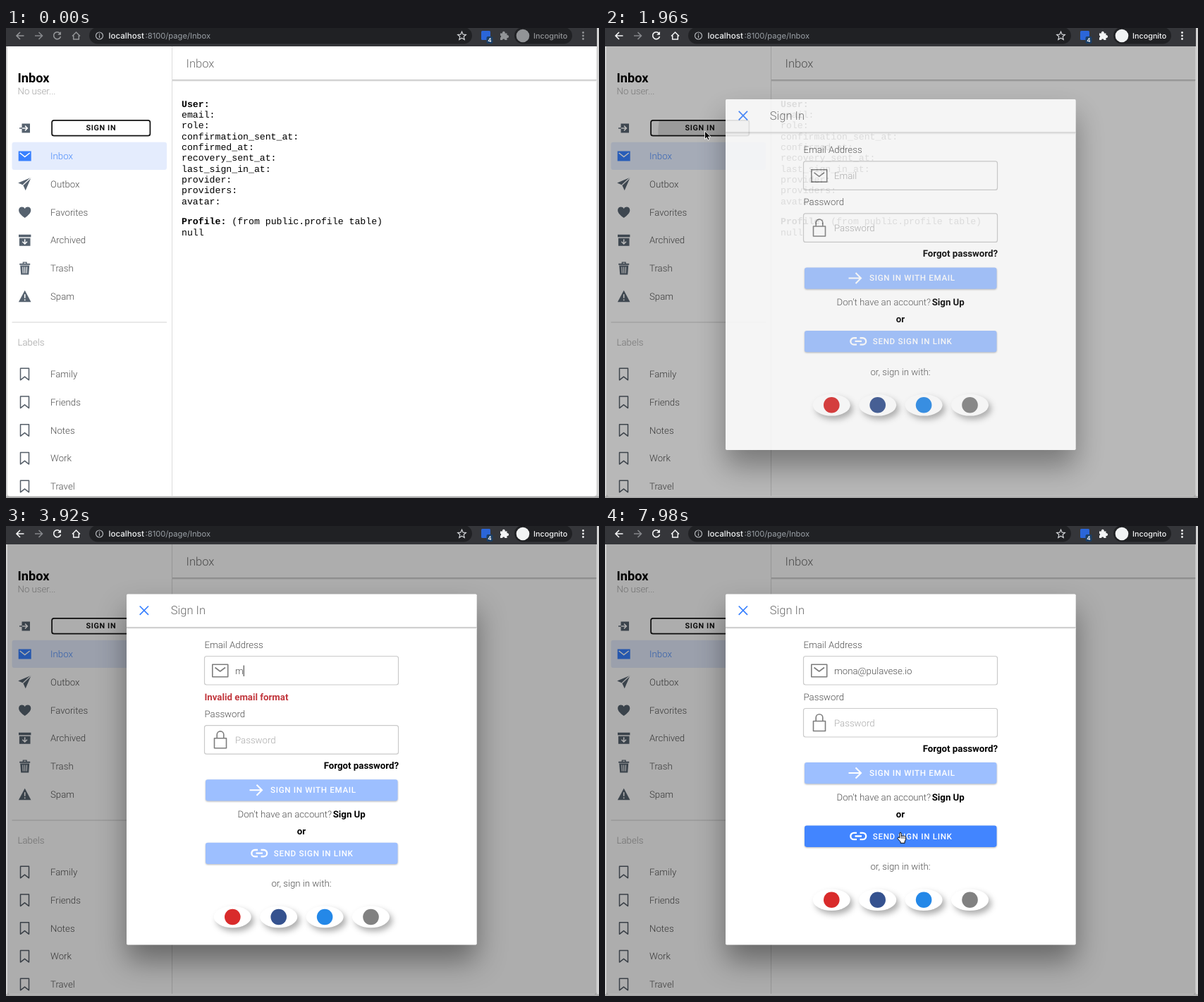
Recreate the animation shown at these times as an HTML page. Size 841 px wide and 666 px high, loop 8 s.

```html
<!DOCTYPE html>
<html lang="en">
<head>
<meta charset="utf-8">
<title>Inbox sign in</title>
<style>
html, body { margin: 0; width: 100%; height: 100%; overflow: hidden; background: #d2d2d2; }
svg { display: block; width: 841px; height: 666px; font-family: Roboto, sans-serif; text-rendering: geometricPrecision; }
.ui { font-family: Inter, "Open Sans", sans-serif; }
.code { font-family: "Liberation Mono", monospace; }
.caps { letter-spacing: .06em; }
.panel { filter: drop-shadow(0 23px 20px rgba(0,0,0,.4)); }
.button { filter: drop-shadow(0 1.5px 1.2px rgba(0,0,0,.28)); }
.pill { filter: drop-shadow(4px 5px 4px rgba(0,0,0,.32)); }
</style>
</head>
<body>
<svg id="stage" viewBox="0 0 841 666"></svg>
<script>
const stage = document.getElementById('stage');
const LOOP = 8000, STEP = 70, ROW = 39.75, BLUE = '#3880ff', ICON = '#56626f';
const EMAIL = 'mona@pulavese.io';
const KEY_TIMES = [3850, 4060, 4130, 4200, 4480, 4830, 4900, 5110, 5180, 5390, 5460, 5530, 5530, 5740, 6020, 6370];
const FOLDERS = ['Inbox', 'Outbox', 'Favorites', 'Archived', 'Trash', 'Spam'];
const LABELS = ['Family', 'Friends', 'Notes', 'Work', 'Travel'];
const FIELDS = ['email', 'role', 'confirmation_sent_at', 'confirmed_at', 'recovery_sent_at',
  'last_sign_in_at', 'provider', 'providers', 'avatar'];

// Pointer path: time, x, y
const PATH = [
  [70, 746, 648], [420, 428, 521], [840, 428, 521], [980, 250, 470], [1050, 90, 380], [1120, 40, 268],
  [1190, 40, 268], [1260, 147, 252], [1330, 146, 222], [1400, 144, 184], [1470, 142, 154], [1610, 141.5, 146],
  [2030, 141.5, 146], [2240, 230, 172], [2520, 371, 225], [2730, 371, 192], [2800, 371, 192],
  [3080, 375, 196], [3290, 377, 200], [6860, 377, 200], [7210, 390, 400], [7350, 408, 512],
  [7420, 408, 514], [7700, 418, 436], [7770, 419, 434.5]
];

const rect = (x, y, w, h, fill, r = 0, more = '') =>
  `<rect x="${x}" y="${y}" width="${w}" height="${h}" rx="${r}" fill="${fill}" ${more}/>`;
const circle = (x, y, r, fill, more = '') => `<circle cx="${x}" cy="${y}" r="${r}" fill="${fill}" ${more}/>`;
const shape = (d, fill) => `<path d="${d}" fill="${fill}"/>`;
const line = (d, color, w = 1.6, more = '') =>
  `<path d="${d}" fill="none" stroke="${color}" stroke-width="${w}" ${more}/>`;
const text = (x, y, s, fill, size = 13.24, weight = 300, more = '') =>
  `<text x="${x}" y="${y}" fill="${fill}" font-size="${size}" font-weight="${weight}" ${more}>${s}</text>`;
const at = (x, y, s, more = '') => `<g transform="translate(${x} ${y})" ${more}>${s}</g>`;
const MIDDLE = 'text-anchor="middle"';
const underline = (x, y, w) => ['#c9c9c9', '#d9d9d9', '#f0f0f0'].map((c, i) => rect(x, y + i, w, 1, c)).join('');

const folderIcons = [
  shape('M-9-7H9V7H-9Z', BLUE) + line('M-7-4.5L0 1L7-4.5', '#fff', 1.5),
  shape('M9-9.5L-9.5-1.8L-2.5 1.2L1 9Z', ICON) + line('M9-9.5L-2.5 1.2', '#fff', 1.2),
  shape('M0 8C-5 4.5-8.6 1-8.6-2.8C-8.6-8-2.4-9-0-5C2.4-9 8.6-8 8.6-2.8C8.6 1 5 4.5 0 8Z', ICON),
  rect(-8.7, -8, 17.4, 3.6, ICON) + rect(-7.8, -3, 15.6, 11, ICON) +
    line('M0-1.5V5M-3.3 2L0 5.3L3.3 2', '#fff', 1.5),
  shape('M-7.5-6.8H-3V-9H3V-6.8H7.5V-4.8H-7.5ZM-6.5-4H6.5L5.5 9H-5.5Z', ICON) +
    line('M-2.8-2L-2.4 7M0-2V7M2.8-2L2.4 7M-1.5-7.2H1.5', '#fff', 1.1),
  shape('M0-8.5L8.8 8H-8.8Z', ICON) + line('M0-3V2.5M0 4.2V6', '#fff', 1.6)
];
const bookmark = line('M-6-8.3H6V8.3L0 3.6L-6 8.3Z', '#555e68', 1.5, 'stroke-linejoin="round"');

function browserBar(active) {
  const fg = active ? '#f4f5f6' : '#929497', dim = '#85878b';
  return rect(0, 0, 838, 26, '#35363a') +
    line('M25.500 11H15M20 6L15 11L20 16', fg, 1.6) +
    line('M41 11H51.500M46.500 6L51.500 11L46.500 16', dim, 1.6) +
    line('M76.500 7.500A5 5 0 1 0 77.500 12', fg, 1.6) + shape('M78 5V9.800H73.200Z', fg) +
    line('M94 11.500L99.500 6L105 11.500M95.700 10.500V16H103.300V10.500', fg, 1.5) +
    rect(118, -1, 543, 23.5, '#202124', 11.7) +
    circle(132.5, 11, 5, 'none', 'stroke="#b4b7bb" stroke-width="1.200"') + line('M132.500 10.300V14M132.500 8V9.300', '#b4b7bb', 1.2) +
    text(145.500, 15.2, 'localhost', '#f1f3f4', 11.6, 500, 'class="ui"') +
    text(197.500, 15.2, ':8100/page/Inbox', '#9aa0a6', 11.2, 400, 'class="ui"') +
    line('M646.500 5.300L648.200 9.200L652.300 9.500L649.200 12.300L650.200 16.400L646.500 14.200L642.800 16.400L643.800 12.300L640.700 9.500L644.800 9.200Z', '#d5d7da', 1.2) +
    rect(674, 4, 13, 13, '#2b66d9', 1.5) + rect(681.5, 12, 9, 10, '#1c3f66', 2) +
    text(686, 20.3, '4', '#fff', 8, 600, 'class="ui" ' + MIDDLE) +
    shape('M701 7.500H704A2 2 0 1 1 707.700 7.500H710.500V10.200A2 2 0 1 1 710.500 14V17H707.500A1.800 1.800 0 0 0 704 17H701V13.800A1.800 1.800 0 0 0 701 10.400Z', fg) +
    rect(721, -1, 82, 23.5, '#202124', 11.7) + circle(733, 11, 9.3, active ? '#f1f3f4' : '#929497') +
    text(748, 15, 'Incognito', fg, 10.8, 500, 'class="ui"') +
    [6.5, 11, 15.5].map(y => circle(818.5, y, 1.4, fg)).join('');
}

function page(t, mouse) {
  const hover = t >= 1260 && t < 1470 ? Math.round((mouse.y + 6 - 181.5) / ROW) : -1;
  let s = rect(2, 20, 835.5, 643.5, '#fff', 4) + rect(235, 26, 1, 637.5, '#dcdcdc') +
    underline(236, 73, 601.5) + text(255.5, 55.6, 'Inbox', '#6c6c6c', 16.55) +
    text(16.5, 77, 'Inbox', '#000', 18.2, 700) + text(16.5, 94, 'No user...', '#a5a5a5') +
    rect(22.5, 135.5, 11.5, 13, ICON) + line('M19 142H23', ICON, 1.5) +
    line('M23 142H30M27 138.600L30.400 142L27 145.400', '#fff', 1.5);

  const age = t - 1750;
  if (t >= 1470 && t < 2030) s += rect(65, 131, 139, 22, 'rgba(0,0,0,.04)', 3);
  if (age >= 0 && age < 700) {
    const fade = Math.min(1, (700 - age) / 350);
    s += `<clipPath id="btn">${rect(65, 131, 139, 22, '#000', 3)}</clipPath>` +
      circle(141.5, 146, 20 + Math.min(age, 420) * .22, '#000', `opacity="${.12 * fade}" clip-path="url(#btn)"`);
  }
  s += rect(65.1, 130.9, 139.3, 21.8, 'none', 3, 'stroke="#111" stroke-width="1.700"') +
    text(134.8, 145.4, 'SIGN IN', '#111', 10.8, 700, 'class="caps" ' + MIDDLE);

  FOLDERS.forEach((name, i) => {
    const y = 181.5 + ROW * i;
    if (!i) s += rect(8.5, 161.8, 219.5, 39.2, '#e4ecfd', 3.3);
    else if (i === hover) s += rect(8.5, y - 19.8, 219.5, 39.4, '#f6f6f6', 3.3);
    s += at(26.7, y, folderIcons[i]) + text(63, y + 4.6, name, i ? '#505050' : '#4b8bfa');
  });
  s += rect(8.5, 416.5, 219.5, 1, '#d4d4d4') + text(16.5, 449.5, 'Labels', '#a0a0a0');
  LABELS.forEach((name, i) => {
    const y = 490.5 + ROW * i;
    s += at(26.5, y, bookmark) + text(63, y + 4.6, name, '#505050');
  });

  const code = (i, str, weight = 400, x = 249) => text(x, 111.7 + 15.33 * i, str, '#000', 13.2, weight, 'class="code"');
  s += code(0, 'User:', 700) + FIELDS.map((f, i) => code(i + 1, f + ':')).join('') +
    code(10.86, 'Profile:', 700) + code(10.86, '(from public.profile table)', 400, 320.3) + code(11.86, 'null');

  if (t >= 1260 && t < 1610) {
    const name = FOLDERS[Math.max(0, hover)];
    s += shape(`M2 646.500H${name === 'Favorites' ? 149 : 138}q3 0 3 3V663.500H2Z`, '#55585c') +
      text(6, 658.6, 'localhost:8100/page/' + name, '#dcdee0', 9.6, 400, 'class="ui"');
  }
  return s;
}

function input(y, icon, value, color) {
  return rect(281.5, y, 275, 40.5, '#fff', 3, 'stroke="#cacaca" stroke-width="1.200"') + icon +
    text(325, y + 25.3, value, color);
}

function button(y, label, x, icon, fill) {
  return rect(283, y, 272.5, 30.3, fill, 3.3, 'class="button"') + icon +
    text(x, y + 18.9, label, '#fff', 11.6, 500, 'class="caps"');
}

function modal(t) {
  const typed = EMAIL.slice(0, KEY_TIMES.filter(k => k <= t).length);
  const done = typed === EMAIL, error = typed && !done;
  const caret = t >= 3360 && t < 6930 || t >= 7420 && t < 7980;
  const mail = line('M292.800 196.300H314.700V213.700H292.800ZM296.500 200.500L303.700 206L311 200.500', '#7d7d7d', 1.6, 'stroke-linejoin="round"');
  const lock = line('M295.500 276.500H312.500V290.500H295.500ZM299.200 276.500V271.500a4.800 4.800 0 0 1 9.600 0V276.500', '#7d7d7d', 1.6, 'stroke-linejoin="round"');
  const arrow = line('M345.500 350H362.500M355.500 342.500L363 350L355.500 357.500', '#fff', 2.1);
  const link = line('M357 434.800H353a4.700 4.700 0 0 0 0 9.400H357M361.500 434.800H365.500a4.700 4.700 0 0 1 0 9.400H361.500M354.500 439.500H364', '#fff', 2.3);
  const lower = text(281.5, 246.5, 'Password', '#505050') + input(258.5, lock, 'Password', '#ababab') +
    text(557, 320, 'Forgot password?', '#000', 13.24, 700, 'text-anchor="end"') +
    button(335, 'SIGN IN WITH EMAIL', 375, arrow, '#9dbfff') +
    text(328.5, 389, "Don't have an account?", '#505050') + text(463.7, 389, 'Sign Up', '#000', 13.24, 700) +
    text(419, 413, 'or', '#000', 13.24, 700, MIDDLE) +
    button(424.6, 'SEND SIGN IN LINK', 379.7, link, done ? '#4285ff' : '#9dbfff') +
    text(419, 487.3, 'or, sign in with:', '#505050', 13.24, 300, MIDDLE) +
    ['#d92b2b', '#35528f', '#2488e8', '#818181'].map((c, i) => {
      const x = 321.3 + 65.4 * i;
      return `<ellipse cx="${x}" cy="529.800" rx="26.500" ry="15.300" fill="#fff" class="pill"/>` + circle(x, 529.8, 11.3, c);
    }).join('');
  return rect(171, 96.5, 496.7, 497, '#fff', 1.7, 'class="panel"') + underline(171, 143, 496.7) +
    line('M189.700 113.500L202 125.800M202 113.500L189.700 125.800', BLUE, 1.7) +
    text(233.8, 125.4, 'Sign In', '#6c6c6c', 16.55) + text(281.5, 172.8, 'Email Address', '#505050') +
    input(184.5, mail, `<tspan id="typed">${typed || 'Email'}</tspan>`, typed ? '#505050' : '#ababab') +
    (caret ? `<rect id="caret" x="325" y="197.500" width="1" height="15.500" fill="#333"/>` : '') +
    (error ? text(281.5, 246.5, 'Invalid email format', '#c2383e', 13.24, 700) : '') +
    at(0, error ? 24.2 : 0, lower);
}

function pointer(t, { x, y }) {
  if (t < 70 || t >= 3850 && t < 6930) return '';
  if (t >= 2520 && t < 3850 || t < 7000 && t >= 6930)
    return at(x, y, line('M-3-6.500Q0-6.500 0-4.500Q0-6.500 3-6.500M0-5V5M-3 6.500Q0 6.500 0 4.500Q0 6.500 3 6.500M-1.500 2H1.500', '#000', 1.2));
  const hand = t >= 1260 && t < 1890 || t >= 7140 && y > 424 && y < 455;
  return hand
    ? at(x - 4.5, y - .5, '<path d="M3.300 8V1.700a1.200 1.200 0 0 1 2.400 0V5.600a1.100 1.100 0 0 1 2.100 0a1.100 1.100 0 0 1 2.100.5a1.100 1.100 0 0 1 2.100.6V10.500L10.600 13V15.300H4.600V13.500L.7 9.200a1.100 1.100 0 0 1 1.600-1.500Z" fill="#fff" stroke="#000" stroke-width="1"/>' +
      line('M5.700 6V9M7.800 6.500V9M9.900 7V9', '#000', .7))
    : at(x, y, '<path d="M0 0V11.500L2.700 9L4.600 13L6.600 12L4.800 8.200H8.500Z" fill="#000" stroke="#fff" stroke-width=".9"/>');
}

function mouseAt(t) {
  const i = PATH.findIndex(k => k[0] > t);
  if (i < 1) { const [, x, y] = i ? PATH[PATH.length - 1] : PATH[0]; return { x, y }; }
  const a = PATH[i - 1], b = PATH[i], p = (t - a[0]) / (b[0] - a[0]);
  return { x: a[1] + (b[1] - a[1]) * p, y: a[2] + (b[2] - a[2]) * p };
}

// cubic-bezier(.36, .66, .04, 1)
function ease(p) {
  if (p <= 0 || p >= 1) return p <= 0 ? 0 : 1;
  const curve = (s, a, b) => 3 * (1 - s) ** 2 * s * a + 3 * (1 - s) * s * s * b + s ** 3;
  let lo = 0, hi = 1;
  for (let i = 0; i < 24; i++) {
    const s = (lo + hi) / 2;
    if (curve(s, .36, .04) < p) lo = s; else hi = s;
  }
  return curve(lo, .66, 1);
}

function draw(t) {
  const mouse = mouseAt(t), open = ease((t - 1858) / 280);
  stage.innerHTML = rect(0, 0, 841, 666, '#d2d2d2') + rect(0, 663.5, 841, 2.5, '#a9a9a9') +
    page(t, mouse) + (open ? rect(2, 26, 835.5, 637.5, '#000', 0, `opacity="${.32 * open}"`) : '') +
    browserBar(t >= 630) +
    (open ? at(0, 33 * (1 - open), modal(t), `opacity="${open}"`) : '') + pointer(t, mouse);
  const caret = document.getElementById('caret');
  if (caret && t >= KEY_TIMES[0])
    caret.setAttribute('x', 325 + document.getElementById('typed').getComputedTextLength());
}

const start = performance.now();
let last = -1;
function tick() {
  const t = Math.floor((performance.now() - start) % LOOP / STEP) * STEP;
  if (t !== last) draw(last = t);
  requestAnimationFrame(tick);
}
tick();
</script>
</body>
</html>
```
